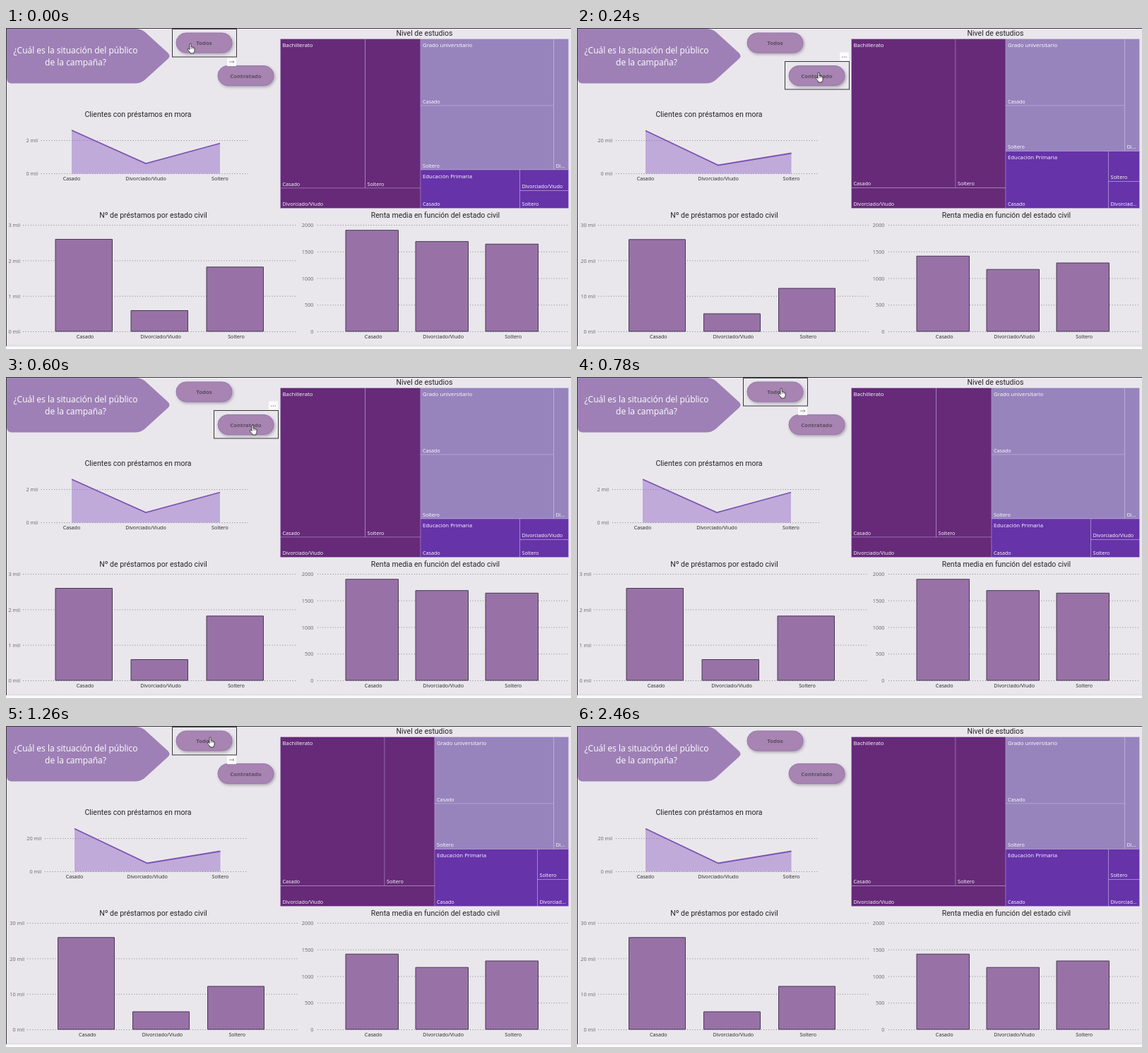
An HTML page with a canvas that plays this animation: 800 by 455 pixels, repeating every 2.76 s.

```html
<!DOCTYPE html>
<html lang="es">
<head>
<meta charset="utf-8">
<title>Situación del público</title>
<style>
html, body { margin: 0; width: 100%; height: 100%; overflow: hidden; background: #e9e7ec; }
canvas { display: block; width: 800px; height: 455px; }
</style>
</head>
<body>
<canvas id="stage" width="800" height="455"></canvas>
<script>
const ctx = document.getElementById('stage').getContext('2d');
const LOOP = 2760;
const SANS = '"Open Sans", "Noto Sans", sans-serif';
const TITLE = '10.5px Roboto, sans-serif';
const LABEL = '7.2px ' + SANS;
const NAMES = ['Casado', 'Divorciado/Viudo', 'Soltero'];
const PLUM = '#662a79', LILAC = '#9784bd', VIOLET = '#6633a9';

// Data for the two filters: only contracted clients, or everybody.
const contracted = {
  unit: 1,
  area: { x0: 50, x1: 345, points: [[93, 145], [198, 192], [303, 163.5]] },
  loans: { x0: 24, x1: 411, first: 70, step: 107, width: 80.5, tops: [299.5, 400.5, 338.8] },
  income: [286.7, 302.7, 306.3],
  tree: { split: 587, single: 508.5, base: 227, primary: 201, side: 727.5, cut: 230.5,
          small: ['Divorciado/Viudo', 'Soltero'] }
};
const everyone = {
  unit: 10,
  area: { x0: 55, x1: 343, points: [[97, 145.5], [200, 194.5], [303.5, 177.5]] },
  loans: { x0: 30, x1: 413, first: 73.5, step: 106, width: 80, tops: [299.8, 405, 369] },
  income: [323.3, 342.2, 333],
  tree: { split: 607, single: 536, base: 226.5, primary: 174.5, side: 752.5, cut: 217.5,
          small: ['Soltero', 'Divorciad...'] }
};

const buttons = [
  { text: 'Todos', x: 241, y: 7, menu: [313, 42], arrow: true },
  { text: 'Contratado', x: 300, y: 53.5, menu: [372, 34.5], arrow: false }
];

// Pointer: time, x, y, shape, hovered button.
const pointer = [
  [0, 260, 22, 'hand', 0],
  [60, 319, 43, 'arrow', 0],
  [120, 327, 51, 'arrow', 1],
  [180, 334, 57, 'hand', 1],
  [240, 341, 63, 'hand', 1],
  [300, 346, 67, 'hand', 1],
  [360, 348, 68, 'hand', 1],
  [660, 338, 60, 'hand', 1],
  [720, 308, 31, 'hand', 0],
  [780, 288, 16, 'hand', 0],
  [1620, 290, 11, 'hand', 0],
  [1680, 293, 3, 'arrow', 0],
  [1740, 0, 0, 'none', 0],
  [1860, 0, 0, 'none', -1]
];

function text(str, x, y, font, color, align = 'left') {
  ctx.font = font;
  ctx.fillStyle = color;
  ctx.textAlign = align;
  ctx.fillText(str, x, y);
}

function line(points, color, width = 1, dash = []) {
  ctx.beginPath();
  points.forEach(([x, y]) => ctx.lineTo(x, y));
  ctx.strokeStyle = color;
  ctx.lineWidth = width;
  ctx.setLineDash(dash);
  ctx.stroke();
  ctx.setLineDash([]);
}

function box(x, y, w, h, fill) {
  ctx.fillStyle = fill;
  ctx.fillRect(x, y, w, h);
}

function grid(x0, x1, y, label, labelX) {
  line([[x0, y], [x1, y]], '#858389', 1, [1, 2.6]);
  text(label, labelX, y + 2.6, '7.3px ' + SANS, '#68666b', 'right');
}

function category(name, x, y) {
  text(name, x, y, LABEL, '#252423', 'center');
}

function bar(x, top, width) {
  ctx.fillStyle = '#9872a6';
  ctx.strokeStyle = '#493754';
  ctx.lineWidth = 1;
  ctx.beginPath();
  ctx.rect(x, top, width, 430 - top);
  ctx.fill();
  ctx.stroke();
}

function backdrop() {
  box(0, 0, 800, 455, '#e9e7ec');
  const fade = ctx.createLinearGradient(0, 448, 0, 455);
  fade.addColorStop(0, '#e9e7ec');
  fade.addColorStop(0.35, '#e0dee3');
  fade.addColorStop(0.6, '#f8f7f9');
  fade.addColorStop(1, '#ffffff');
  box(0, 448, 800, 7, fade);
  box(0, 0, 800, 1, '#3b393e');
  box(0, 0, 1, 451, '#3b393e');
}

function banner() {
  ctx.beginPath();
  ctx.moveTo(1, 1);
  ctx.lineTo(183, 1);
  ctx.quadraticCurveTo(190, 1, 196, 5);
  ctx.lineTo(229, 35);
  ctx.quadraticCurveTo(234, 39.5, 229, 44);
  ctx.lineTo(196, 74);
  ctx.quadraticCurveTo(190, 78.5, 183, 78.5);
  ctx.lineTo(7, 78.5);
  ctx.quadraticCurveTo(1, 78, 1, 71);
  ctx.closePath();
  ctx.fillStyle = '#9e80b6';
  ctx.fill();
  const font = '12px ' + SANS;
  text('¿Cuál es la situación del público', 98.5, 36, font, '#fff', 'center');
  text('de la campaña?', 98.5, 52.5, font, '#fff', 'center');
}

function button({ text: label, x, y }) {
  ctx.save();
  ctx.shadowColor = 'rgba(70,50,80,.45)';
  ctx.shadowBlur = 4;
  ctx.shadowOffsetX = 1.5;
  ctx.shadowOffsetY = 2;
  ctx.beginPath();
  ctx.roundRect(x, y, 79, 28, 14);
  ctx.fillStyle = '#a784b2';
  ctx.fill();
  ctx.restore();
  ctx.strokeStyle = '#9878ae';
  ctx.lineWidth = 1;
  ctx.stroke();
  text(label, x + 39.5, y + 17.2, 'bold 7.8px ' + SANS, '#5c4b60', 'center');
}

function focus({ x, y, menu: [mx, my], arrow }) {
  ctx.strokeStyle = '#39373b';
  ctx.lineWidth = 1;
  ctx.strokeRect(Math.floor(x) - 5.5, Math.floor(y) - 5.5, 91, 39.5);
  box(mx, my, 13, 12, '#fbfafc');
  const cy = my + 6;
  if (arrow) {
    line([[mx + 3, cy], [mx + 10, cy]], '#858388', 0.9);
    line([[mx + 8, cy - 1.6], [mx + 10, cy], [mx + 8, cy + 1.6]], '#858388', 0.8);
  } else {
    for (let i = 0; i < 3; i++) box(mx + 3.2 + i * 2.7, cy, 1.2, 1.2, '#77757a');
  }
}

function areaChart({ x0, x1, points }, unit) {
  text('Clientes con préstamos en mora', 187, 125.5, TITLE, '#252423', 'center');
  grid(x0, x1, 159.5, 2 * unit + ' mil', x0 - 5);
  grid(x0, x1, 206.5, '0 mil', x0 - 5);
  ctx.beginPath();
  points.forEach(([x, y]) => ctx.lineTo(x, y));
  ctx.lineTo(points[2][0], 206.5);
  ctx.lineTo(points[0][0], 206.5);
  ctx.fillStyle = 'rgba(151,110,202,.5)';
  ctx.fill();
  line(points, '#7c53b1', 1.8);
  points.forEach(([x], i) => category(NAMES[i], x, 216));
}

function loanChart({ x0, x1, first, step, width, tops }, unit) {
  text('Nº de préstamos por estado civil', 208.5, 269, TITLE, '#252423', 'center');
  for (let i = 0; i < 4; i++) grid(x0, x1, 430.5 - i * 50.3, (i && i * unit) + ' mil', x0 - 4);
  tops.forEach((top, i) => {
    const x = first + i * step;
    bar(x, top, width);
    category(NAMES[i], x + width / 2 + 1.8, 439.6);
  });
}

function incomeChart(tops) {
  text('Renta media en función del estado civil', 608, 269, TITLE, '#252423', 'center');
  for (let i = 0; i < 5; i++) grid(441, 796, 430.5 - i * 37.75, String(i * 500), 435.5);
  tops.forEach((top, i) => {
    const x = 481 + i * 99;
    bar(x, top, 74.5);
    category(NAMES[i], x + 39.2, 439.6);
  });
}

function cell(x0, y0, x1, y1, fill, name) {
  box(x0, y0, x1 - x0, y1 - y0, fill);
  ctx.strokeStyle = 'rgba(225,205,245,.32)';
  ctx.lineWidth = 0.9;
  ctx.strokeRect(x0, y0, x1 - x0, y1 - y0);
  text(name, x0 + 3, y1 - 3.2, LABEL, '#fff');
}

function treemap({ split, single, base, primary, side, cut, small }) {
  const L = 388.5, T = 15.5, R = 796.5, B = 255.5;
  text('Nivel de estudios', 592.5, 11, TITLE, '#252423', 'center');
  cell(L, T, single, base, PLUM, 'Casado');
  cell(single, T, split, base, PLUM, 'Soltero');
  cell(L, base, split, B, PLUM, 'Divorciado/Viudo');
  cell(split, T, 775.5, 110, LILAC, 'Casado');
  cell(split, 110, 775.5, primary, LILAC, 'Soltero');
  cell(775.5, T, R, primary, LILAC, 'Di...');
  cell(split, primary, side, B, VIOLET, 'Casado');
  cell(side, primary, R, cut, VIOLET, small[0]);
  cell(side, cut, R, B, VIOLET, small[1]);
  const font = '7.8px ' + SANS;
  text('Bachillerato', L + 3, 27, font, '#fff');
  text('Grado universitario', split + 3, 27, font, '#fff');
  text('Educación Primaria', split + 3, primary + 11.7, font, '#fff');
}

const shapes = {
  arrow: new Path2D('M0 0V11L2.6 8.7L4.4 12.6L6.2 11.8L4.5 8H8Z'),
  hand: new Path2D('M0 1.2Q.1 0 1.1 0Q2.2 0 2.2 1.2V5Q3.4 4.4 4 5.4Q5.2 4.8 5.7 5.9Q7 5.6 7.1 7V10Q7 11.6 6 12.6V14H.8V12.7Q-1.2 10.8-2.7 8.4Q-2.9 7.3-1.9 7.1Q-1 7.1 0 8.6Z')
};

function cursor(x, y, shape) {
  if (!shapes[shape]) return;
  ctx.save();
  ctx.translate(x, y);
  ctx.fillStyle = '#fff';
  ctx.strokeStyle = '#29272b';
  ctx.lineWidth = 0.9;
  ctx.lineJoin = 'round';
  ctx.fill(shapes[shape]);
  ctx.stroke(shapes[shape]);
  if (shape === 'hand') {
    for (let i = 0; i < 3; i++) line([[2.2 + i * 1.7, 5.5], [2.2 + i * 1.7, 8]], '#55525a', 0.6);
  }
  ctx.restore();
}

function draw(t) {
  const filtered = t < 60 || (t >= 600 && t < 1080);
  const data = filtered ? contracted : everyone;
  const [, x, y, shape, hovered] = pointer.findLast(p => p[0] <= t);
  backdrop();
  banner();
  treemap(data.tree);
  areaChart(data.area, data.unit);
  loanChart(data.loans, data.unit);
  incomeChart(data.income);
  buttons.forEach(button);
  if (hovered >= 0) focus(buttons[hovered]);
  cursor(x, y, shape);
}

const start = performance.now();
function tick() {
  draw((performance.now() - start) % LOOP);
  requestAnimationFrame(tick);
}
tick();
</script>
</body>
</html>
```
